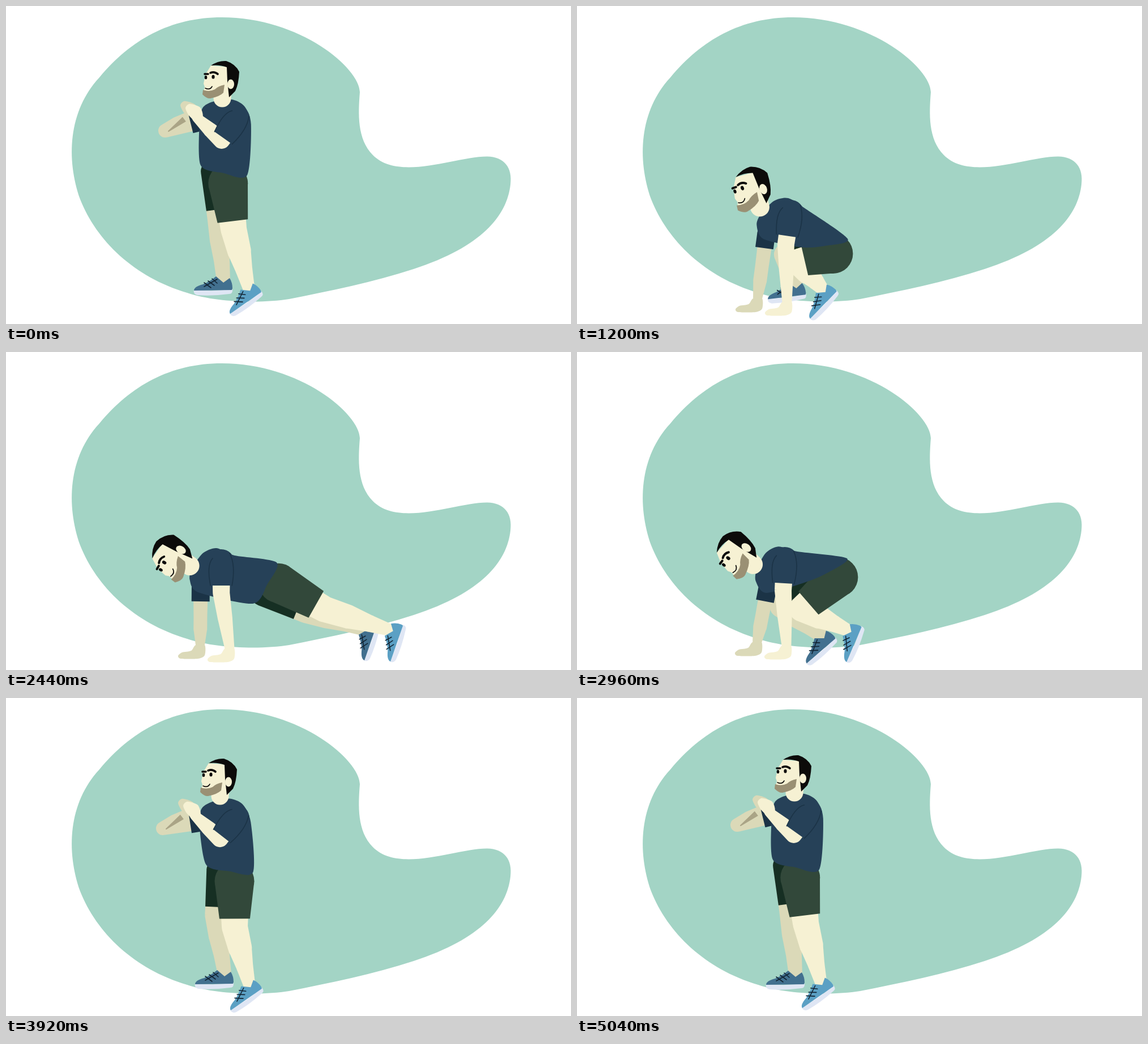
An HTML page with a canvas for the animation above (5080 ms loop, 998 px wide and 561 px high).

```html
<!DOCTYPE html>
<html lang="en">
<head>
<meta charset="utf-8">
<title>Burpee</title>
<style>
  html, body { margin: 0; width: 100%; height: 100%; overflow: hidden; background: #fff; }
  canvas { display: block; }
</style>
</head>
<body>
<canvas id="stage" width="998" height="561"></canvas>
<script>
const ctx = document.getElementById('stage').getContext('2d');
const LOOP = 5080, STEP = 40;
const C = {
  ground: '#a3d4c5', skin: '#f6f1d3', tan: '#dbd9b8', shade: '#aaa486',
  shirt: '#264158', fold: '#1b3346', shorts: '#32483a', shortsFar: '#162f23',
  shoe: '#5ba0c4', shoeFar: '#42708f', sole: '#dfe6f4', lace: '#122433',
  beard: '#9a9074', ink: '#0c0b0a'
};

const backdrop = new Path2D('M381,20C520,20 625,110 625,152C622,190 620,235 648,263C695,310 795,265 850,265.5C880,266 895,285 891,315C885,370 840,425 720,464C650,487 570,503 500,517C450,525 370,523 320,506C226,478 160,414 131,341C106,270 110,185 165,126C220,60 290,20 381,20Z');

// Head parts, with the ear as origin
const face = new Path2D('M-35,-33L-43,-20Q-47,-8 -48,-1L-46,5L-48,12L-40,24L-15,20L0,12L2,-30Z');
const hair = new Path2D('M-35,-33Q-22,-42 -8,-41Q8,-36 15,-22Q14,0 8,12L-3,23L-6,-5L-7,-30Q-20,-35 -35,-33Z');
const beard = new Path2D('M-49,10L-50,18Q-42,26 -36,25Q-20,22 -13,15L-11,1Q-22,3 -28,9Q-38,14 -49,10Z');
const smile = new Path2D('M-45,7Q-37,11 -33,4');
const brows = new Path2D('M-36,-20Q-29,-23 -23,-18M-46,-18L-40,-18');

// Shoe parts, with the ankle as origin
const upper = new Path2D('M-13,-7L0,4L11,-4Q16,4 16,14L15,17L-52,18Q-52,11 -36,7Q-24,2 -13,-7Z');
const sole = new Path2D('M16,15Q17,24 10,24Q-20,28 -46,26Q-54,24 -52,16Q-18,21 16,15Z');
const laces = new Path2D('M-34,4L-22,13M-27,1L-16,9M-20,-3L-11,5M-34,11L-11,-2');

// Hand outlines, with the wrist as origin
const FIST = [[10, 0], [-2, 6], [-14, -4], [-20, -17], [-14, -24], [-2, -22], [6, -18], [10, -9]];
const PALM = [[8, 0], [8, 18], [-4, 24], [-34, 24], [-39, 19], [-32, 13], [-16, 10], [-8, 0]];

// head: x, y, tilt; hand: x, y, palm on floor, elbow bend;
// pelvis: x, y, tilt; near and far foot: x, y, tilt, knee bend
const stand = {
  head: [397, 138, 0], shoulder: [407, 200], hand: [337, 197, 0, -38],
  pelvis: [381, 289, 12], near: [429, 499, -34, 6], far: [384, 484, 0, -2]
};
const rise = {
  head: [393, 148, 0], shoulder: [406, 212], hand: [333, 207, 0, -38],
  pelvis: [391, 300, 9], near: [430, 507, -34, 11], far: [386, 487, 0, 9]
};
const squat = {
  head: [388, 190, -4], shoulder: [394, 250], hand: [324, 249, 0, -38],
  pelvis: [434, 350, -2], near: [430, 506, -34, 52], far: [386, 487, 0, 48]
};
const crouch = {
  head: [329, 323, -20], shoulder: [377, 366], hand: [371, 522, 1, 6],
  pelvis: [433, 419, -10], near: [436, 502, -45, 56], far: [387, 494, -6, 42]
};
const kick = {
  head: [306, 387, -87], shoulder: [379, 368], hand: [391, 522, 1, 3],
  pelvis: [444, 358, -66], near: [570, 440, -76, 72], far: [518, 487, -76, 75]
};
const plank = {
  head: [309, 349, -60], shoulder: [380, 372], hand: [395, 523, 1, 5],
  pelvis: [455, 411, -60], near: [680, 491, -70, 11], far: [634, 489, -70, 5]
};
const tuck = {
  head: [299, 345, -53], shoulder: [367, 368], hand: [370, 518, 1, 4],
  pelvis: [437, 387, -30], near: [481, 492, -66, 74], far: [434, 502, -40, 70]
};

const each = (p, fn) => Object.fromEntries(
  Object.entries(p).map(([part, vals]) => [part, vals.map((v, i) => fn(v, i, part))]));
const mix = (a, b, k) => each(a, (v, i, part) => v + (b[part][i] - v) * k);
const shift = (p, dx, dy) => each(p, (v, i) => v + ([dx, dy][i] || 0));

const reach = { ...mix(squat, crouch, 0.5), hand: [293, 413, 0.7, -20] };
const pullIn = { ...mix(kick, plank, 0.25), head: [303, 350, -57] };
const land = { ...mix(tuck, crouch, 0.5), near: crouch.near, far: crouch.far };
const apex = { ...shift(stand, 2, -84), near: [456, 408, -60, 20], far: [414, 392, -35, 14] };

const KEYS = [
  [0, stand], [560, squat], [840, reach], [1200, crouch], [1560, kick],
  [1820, plank], [2440, plank], [2800, pullIn], [2960, tuck], [3090, land],
  [3320, crouch], [3620, reach], [3790, squat], [3920, rise],
  [4120, shift(stand, 0, 8)], [4280, shift(stand, 0, 4)], [4620, apex],
  [4900, shift(stand, 2, 6)], [5040, shift(stand, 2, 4)], [LOOP, stand]
];

// Monotone cubic through the keys
function sample(t) {
  const last = KEYS.length - 2;
  let k = 0;
  while (k < last && t >= KEYS[k + 1][0]) k++;
  const tangent = (a, b) => a * b <= 0 ? 0 : 2 * a * b / (a + b);
  const [t0, from] = KEYS[k], [t1, to] = KEYS[k + 1];
  const h = t1 - t0, u = (t - t0) / h, w = 1 - u;
  return each(from, (v, i, part) => {
    const slope = n => n < 0 || n > last ? 0
      : (KEYS[n + 1][1][part][i] - KEYS[n][1][part][i]) / (KEYS[n + 1][0] - KEYS[n][0]);
    const m0 = tangent(slope(k - 1), slope(k)), m1 = tangent(slope(k), slope(k + 1));
    return v * (1 + 2 * u) * w * w + to[part][i] * u * u * (3 - 2 * u) + h * u * w * (m0 * w - m1 * u);
  });
}

const lerp = (a, b, k) => [a[0] + (b[0] - a[0]) * k, a[1] + (b[1] - a[1]) * k];
const add = ([x, y], dx, dy) => [x + dx, y + dy];

// Point given in a frame at `origin` turned by `deg`
function local([ox, oy], deg, x, y) {
  const a = deg * Math.PI / 180, c = Math.cos(a), s = Math.sin(a);
  return [ox + x * c - y * s, oy + x * s + y * c];
}

// Middle joint of a limb, pushed sideways by `bend`
function joint(a, b, k, bend) {
  const dx = b[0] - a[0], dy = b[1] - a[1], d = Math.hypot(dx, dy) || 1;
  return add(lerp(a, b, k), -dy / d * bend, dx / d * bend);
}

// Tapered chain of [point, radius]; `open` leaves the far end flat
function limb(color, chain, open) {
  ctx.beginPath();
  chain.forEach(([[x, y], r], i) => {
    if (!(open && i === chain.length - 1)) {
      ctx.moveTo(x + r, y);
      ctx.arc(x, y, r, 0, 7);
    }
    if (!i) return;
    const [[px, py], pr] = chain[i - 1];
    const d = Math.hypot(x - px, y - py) || 1;
    const nx = (py - y) / d, ny = (x - px) / d;
    ctx.moveTo(px + nx * pr, py + ny * pr);
    ctx.lineTo(px - nx * pr, py - ny * pr);
    ctx.lineTo(x - nx * r, y - ny * r);
    ctx.lineTo(x + nx * r, y + ny * r);
    ctx.closePath();
  });
  ctx.fillStyle = color;
  ctx.fill();
}

// Closed soft outline through points
function soft(color, pts, k = 0.13) {
  const at = i => pts[(i + pts.length) % pts.length];
  ctx.beginPath();
  ctx.moveTo(...at(0));
  pts.forEach((b, i) => {
    const a = at(i - 1), c = at(i + 1), d = at(i + 2);
    ctx.bezierCurveTo(b[0] + (c[0] - a[0]) * k, b[1] + (c[1] - a[1]) * k,
      c[0] - (d[0] - b[0]) * k, c[1] - (d[1] - b[1]) * k, c[0], c[1]);
  });
  ctx.fillStyle = color;
  ctx.fill();
}

function fill(path, color) { ctx.fillStyle = color; ctx.fill(path); }
function line(path, color, width) {
  ctx.strokeStyle = color;
  ctx.lineWidth = width;
  ctx.stroke(path);
}
function dot(x, y, rx, ry, color) {
  ctx.beginPath();
  ctx.ellipse(x, y, rx, ry, 0, 0, 7);
  ctx.fillStyle = color;
  ctx.fill();
}

function place([x, y], deg, scale, draw) {
  ctx.save();
  ctx.translate(x, y);
  ctx.rotate(deg * Math.PI / 180);
  ctx.scale(scale, scale);
  draw();
  ctx.restore();
}

function leg(hip, [x, y, tilt, bend], radii, skin, shoe, shorts, waist, hem) {
  const ankle = [x, y], knee = joint(hip, ankle, 0.43, bend);
  const points = [hip, knee, lerp(knee, ankle, 0.36), lerp(knee, ankle, 0.68), ankle];
  limb(skin, points.map((pt, i) => [pt, radii[i]]));
  place(ankle, tilt, 1, () => {
    fill(sole, C.sole);
    fill(upper, shoe);
    line(laces, C.lace, 1.6);
  });
  limb(shorts, [[hip, waist], [lerp(hip, knee, 0.82), hem]], true);
}

function arm(color, shoulder, elbow, wrist, palm, radii) {
  const points = [shoulder, elbow, lerp(elbow, wrist, 0.45), wrist];
  limb(color, points.map((pt, i) => [pt, radii[i]]));
  soft(color, FIST.map((f, i) => add(wrist, ...lerp(f, PALM[i], palm))));
}

function sleeve(color, shoulder, elbow, length, r0, r1) {
  const d = Math.hypot(elbow[0] - shoulder[0], elbow[1] - shoulder[1]) || 1;
  limb(color, [[shoulder, r0], [lerp(shoulder, elbow, length / d), r1]], true);
}

function creases(shoulder, elbow, length, r) {
  const deg = Math.atan2(elbow[1] - shoulder[1], elbow[0] - shoulder[0]) * 180 / Math.PI;
  const path = new Path2D();
  for (const [side, top] of [[-1, -17], [1, -8]]) {
    path.moveTo(...local(shoulder, deg, top, side * 15));
    path.quadraticCurveTo(...local(shoulder, deg, 4, side * 26), ...local(shoulder, deg, length, side * r));
  }
  line(path, C.fold, 1.6);
}

function head([x, y, tilt], scale) {
  place([x, y], tilt, scale, () => {
    limb(C.skin, [[[-12, 8], 14], [[-15, 25], 15.5]]);
    fill(face, C.skin);
    fill(hair, C.ink);
    fill(beard, C.beard);
    line(smile, C.ink, 1.6);
    line(brows, C.ink, 3.6);
    dot(-31, -13, 2.6, 3.6, C.ink);
    dot(-44, -12, 2.3, 3.3, C.ink);
    dot(0, 0, 6, 8.5, C.skin);
  });
}

function draw(p) {
  const [hx, hy, palm, bend] = p.hand;
  const shoulder = p.shoulder, wrist = [hx, hy];
  const elbow = joint(shoulder, wrist, 0.35, bend);

  // The chest follows part of the spine's lean
  const lean = Math.atan2(p.pelvis[1] - shoulder[1], p.pelvis[0] - shoulder[0]) * 180 / Math.PI;
  const turn = 0.6 * (lean - 104);
  const chest = (x, y) => local(shoulder, turn, x, y);
  const pelvis = (x, y) => local(p.pelvis, p.pelvis[2], x, y);

  const shoulderF = chest(-56, 4);
  const wristF = add(wrist, ...lerp([-9, -5], [-52, -6], palm));
  const elbowF = lerp(add(wristF, -47, 28), lerp(shoulderF, wristF, 0.5), palm);

  ctx.fillStyle = '#fff';
  ctx.fillRect(0, 0, 998, 561);
  fill(backdrop, C.ground);

  leg(pelvis(-16, 6), p.far, [19, 19, 18, 14, 12], C.tan, C.shoeFar, C.shortsFar, 20, 19);

  arm(C.tan, shoulderF, elbowF, wristF, palm, [13, 12, 12, 8]);
  ctx.globalAlpha = 1 - Math.min(1, Math.max(0, palm));
  limb(C.shade, [[add(elbowF, 6, 1), 1], [lerp(elbowF, wristF, 0.72), 5]], true);
  ctx.globalAlpha = 1;
  sleeve(C.fold, shoulderF, elbowF, 25, 16, 16);

  leg(pelvis(16, 21), p.near, [27, 23, 21, 15, 10.5], C.skin, C.shoe, C.shorts, 35, 27);

  soft(C.shirt, [
    chest(-43, -30), chest(-60, -19), chest(-65, 8),
    pelvis(-38, 0), pelvis(4, 5), pelvis(46, 0),
    chest(26, 8), chest(13, -24), chest(-10, -35)
  ]);
  head(p.head, 1 + 0.1 * palm);
  arm(C.skin, shoulder, elbow, wrist, palm, [16, 15, 13, 8.5]);
  sleeve(C.shirt, shoulder, elbow, 40, 24, 19);
  creases(shoulder, elbow, 40, 19);
}

ctx.lineCap = 'round';
const start = performance.now();
function tick() {
  const t = Math.max(0, performance.now() - start) % LOOP;
  draw(sample(Math.floor(t / STEP) * STEP));
  requestAnimationFrame(tick);
}
tick();
</script>
</body>
</html>
```
